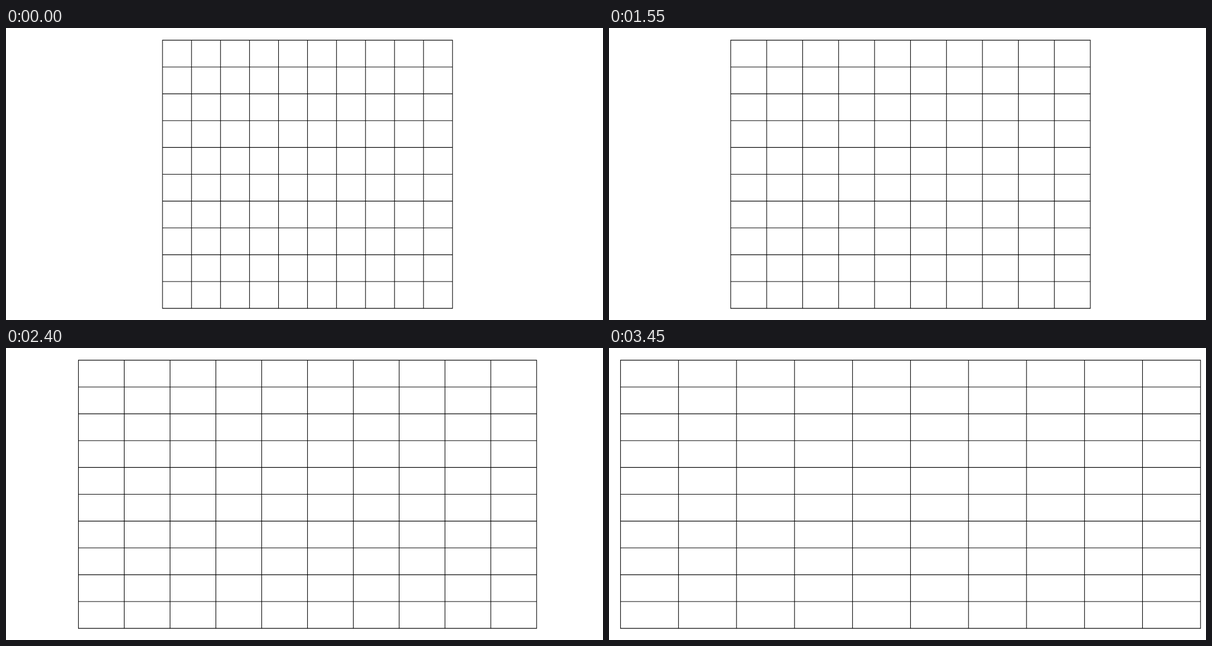
These frames come from a looping animation (1068 by 524 pixels, 6.45 s). An HTML page with a canvas:

```html
<!DOCTYPE html>
<html lang="en">
<head>
<meta charset="utf-8">
<title>Stretching grid</title>
<style>
  html, body { margin: 0; width: 100%; height: 100%; overflow: hidden; background: #fff; }
  canvas { display: block; }
</style>
</head>
<body>
<canvas id="stage" width="1068" height="524"></canvas>
<script>
  const LOOP = 6450, HOLD = 1000, STEP = 50, STEPS = 50;
  const CELLS = 10;
  const center = { x: 539.4, y: 262.5 };
  const half = { x: 259.4, y: 240.6 };
  const canvas = document.getElementById("stage");
  const ctx = canvas.getContext("2d");

  // Number of stretch steps taken at time t; the last one doubles the width.
  function stepAt(t) {
    if (t < HOLD) return 0;
    return Math.min(STEPS, Math.floor((t - HOLD) / STEP) + 1);
  }

  function drawGrid(stretch) {
    const w = half.x * stretch, h = half.y;
    const left = center.x - w, right = center.x + w;
    const top = center.y - h, bottom = center.y + h;

    ctx.fillStyle = "#fff";
    ctx.fillRect(0, 0, canvas.width, canvas.height);
    ctx.strokeStyle = "#000";
    ctx.lineWidth = 1.1;
    ctx.lineCap = "square";
    ctx.beginPath();
    for (let i = 0; i <= CELLS; i++) {
      const x = left + (right - left) * i / CELLS;
      const y = top + (bottom - top) * i / CELLS;
      ctx.moveTo(x, top);
      ctx.lineTo(x, bottom);
      ctx.moveTo(left, y);
      ctx.lineTo(right, y);
    }
    ctx.stroke();
  }

  let start = null;
  function tick(now) {
    if (start === null) start = now;
    drawGrid(1 + stepAt((now - start) % LOOP) / STEPS);
    requestAnimationFrame(tick);
  }

  drawGrid(1);
  requestAnimationFrame(tick);
</script>
</body>
</html>
```
